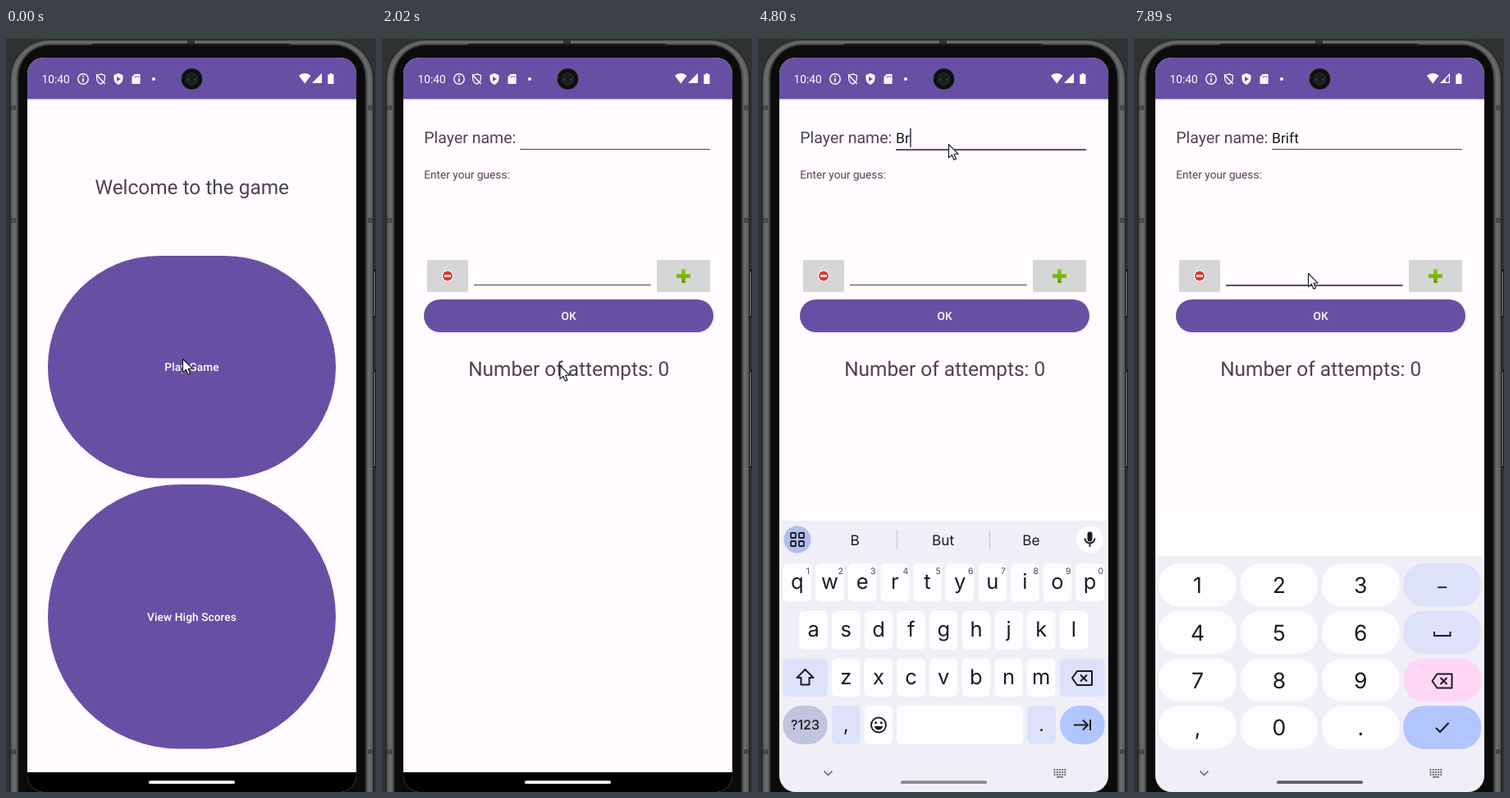
Write an HTML page that moves like this. It is 451x929 px and loops after 8 s.

```html
<!DOCTYPE html>
<html lang="en">
<head>
<meta charset="utf-8">
<title>Guessing game</title>
<style>
html, body { margin: 0; width: 100%; height: 100%; overflow: hidden; background: #2f3132; }
svg { display: block; width: 451px; height: 929px; font-family: Roboto, sans-serif; text-rendering: geometricPrecision; }
#keyboard, #numberPad { font-family: Inter, sans-serif; }
</style>
</head>
<body>
<svg id="stage" viewBox="0 0 451 929"></svg>
<script>
const PURPLE = '#6750a4', INK = '#1c1b1f', GREY = '#49454f', KEY = '#fdfdff', SOFT = '#dde1f9', BLUE = '#b1c5ff';

const rect = (x, y, w, h, fill, r = 0, extra = '') =>
  `<rect x="${x}" y="${y}" width="${w}" height="${h}" rx="${r}" fill="${fill}" ${extra}/>`;
const circle = (x, y, r, fill, extra = '') => `<circle cx="${x}" cy="${y}" r="${r}" fill="${fill}" ${extra}/>`;
const text = (x, y, size, fill, str, extra = '') =>
  `<text x="${x}" y="${y}" font-size="${size}" fill="${fill}" ${extra}>${str}</text>`;
const mid = (x, y, size, fill, str, extra = '') => text(x, y, size, fill, str, `text-anchor="middle" ${extra}`);
const fillPath = (d, fill, extra = '') => `<path d="${d}" fill="${fill}" ${extra}/>`;
const line = (d, color, w = 1.6, extra = '') =>
  `<path d="${d}" fill="none" stroke="${color}" stroke-width="${w}" ${extra}/>`;
const group = (id, body, extra = '') => `<g id="${id}" ${extra}>${body}</g>`;
const at = (x, y, body) => `<g transform="translate(${x} ${y})">${body}</g>`;

function phone() {
  const shells = [[4.5, 14, 48, '#262626'], [6, 15, 47, '#5c5c5c'], [8.5, 16.5, 45, '#6a6a6a'],
    [12, 18.5, 42, '#565656'], [14, 20, 40, '#2a2a2a'], [15.5, 21.5, 38, '#0b0b0b']];
  const gaps = [97, 234, 880].map(y => rect(6, y - 3, 6, 6, '#474747') + rect(441, y - 3, 6, 6, '#474747')).join('');
  const buttons = [[294, 58], [416, 119]].map(([y, h]) =>
    rect(446, y, 8, h, '#151515', 1) + rect(447.5, y + 2, 2.5, h - 4, '#666')).join('');
  return rect(0, 0, 451, 929, '#2f3132') + rect(0, 0, 451, 13, '#3c4142') + buttons +
    shells.map(([x, y, r, c]) => rect(x, y, 453 - 2 * x, 1000, c, r)).join('') +
    gaps + rect(221, 15, 9, 5, '#333') + rect(105, 19, 241, 2.5, '#171717', 1);
}

function statusBar() {
  const shield = 'M0 -7L5.5 -4.8V-.5Q5 5 0 7Q-5 5 -5.5 -.5V-4.8Z';
  return rect(26, 36, 401, 50.5, PURPLE) + text(43.5, 67, 13.8, '#fff', '10:40') +
    circle(94, 62, 6.2, 'none', 'stroke="#fff" stroke-width="1.4"') +
    rect(93.2, 61, 1.6, 4.5, '#fff') + rect(93.2, 58.2, 1.6, 1.6, '#fff') +
    at(115.5, 62, line(shield, '#fff', 1.4, 'transform="scale(.88)"') + line('M-5.5 -5.5L5 6', '#fff', 1.4)) +
    at(137, 62, fillPath(shield, '#fff') + fillPath('M-2 -3L3 0L-2 3Z', PURPLE)) +
    fillPath('M157 56H163.5V68H153.5V59.5Z', '#fff') +
    line('M157.5 58V60.5M159.6 58V60.5M161.6 58V60.5', PURPLE, .9) +
    circle(180, 62, 2, '#fff') +
    fillPath('M357 58Q364 52 371.5 58L364.2 67.5Z', '#fff') +
    fillPath('M385 55V67H373Z', '#fff') +
    group('weakSignal', fillPath('M383.8 58V65.8H380V61.8Z', PURPLE)) +
    fillPath('M394.5 55H397.5V56.5H399.5V68H392.3V56.5H394.5Z', '#fff') +
    circle(226.5, 62, 12.7, '#0f0f0f') + circle(226.5, 62, 7.5, '#1f1f1f', 'stroke="#2a2a2a"') +
    circle(226.5, 62, 3.5, '#17191f') + circle(222.5, 62.5, 1, '#46506a') + circle(230, 62.5, 1, '#46506a');
}

function sparkles() {
  let seed = 7, d = '';
  const rnd = () => (seed = seed * 16807 % 2147483647) / 2147483647;
  for (let i = 0; i < 520; i++) {
    const a = rnd() * Math.PI * 2, r = 78 + (rnd() + rnd()) * 28;
    d += `M${(r * Math.cos(a)).toFixed(1)} ${(r * Math.sin(a)).toFixed(1)}h.8`;
  }
  return line(d, '#cfc2e6', .8, 'opacity=".3"');
}

function home() {
  const label = 'font-weight="500" letter-spacing=".1"';
  return mid(226.7, 202, 24.4, GREY, 'Welcome to the game') +
    rect(51, 277, 351, 270.5, PURPLE, 135.25) +
    `<g clip-path="url(#playClip)">${group('ripple', circle(0, 0, 140, 'url(#glow)') +
      circle(0, 0, 104, '#fff', 'opacity=".035"') + circle(0, 0, 78, '#fff', 'opacity=".035"') + sparkles())}</g>` +
    rect(51, 555, 351, 321.5, PURPLE, 160.75) +
    mid(226.5, 417, 13.65, '#fff', 'Play Game', label) +
    mid(226.5, 721, 13.65, '#fff', 'View High Scores', label);
}

function game() {
  return text(51.3, 140, 19.5, GREY, 'Player name:') + text(51.3, 183, 13.65, GREY, 'Enter your guess:') +
    rect(168, 147, 232, 1, GREY, 0, 'id="nameLine"') + rect(112, 312, 215.5, 1, GREY, 0, 'id="guessLine"') +
    text(168, 140, 17.5, INK, '', 'id="name"') + rect(168, 122, 1.5, 23, '#343047', 0, 'id="caret"') +
    rect(55, 282, 50, 39, '#d4d6d5', 2) + rect(335, 282, 65, 39, '#d4d6d5', 2) +
    circle(80, 301.5, 7, '#fff') + circle(80, 301.5, 5.9, '#ee3030') + rect(76, 300.2, 8, 2.6, '#fff') +
    fillPath('M365.2 293H369.8V299.2H376V303.8H369.8V310H365.2V303.8H359V299.2H365.2Z', 'url(#leaf)') +
    rect(51, 330, 353, 40, PURPLE, 20) +
    mid(227.5, 355, 13.65, '#fff', 'OK', 'font-weight="500" letter-spacing=".1"') +
    mid(227.7, 423, 24.4, GREY, 'Number of attempts: 0');
}

const backspace = (x, y) => at(x, y,
  line('M-12 0L-6 -8.5H12V8.5H-6Z', INK, 2, 'stroke-linejoin="round"') + line('M-2 -4L6 4M6 -4L-2 4', INK, 2));

function toolbar() {
  return at(107.5, 622,
      line('M-9 -8.5H9V3L3 8.5H-9ZM9 2H3V8', INK, 2, 'stroke-linejoin="round"') +
      line('M-5 1Q-2 6 2 3', INK, 1.6) + circle(-4, -3, 1.4, INK) + circle(3.5, -3, 1.4, INK)) +
    mid(167, 627, 14, INK, 'GIF', 'font-weight="900" letter-spacing=".5"') +
    at(226.5, 622, line('M-8 -7.5H8V8.5H-8Z', INK, 2, 'stroke-linejoin="round"') + rect(-4, -10, 8, 4.5, INK, 1) +
      line('M-4.5 -2H4.5M-4.5 1.5H4.5M-4.5 5H2', INK, 1.7)) +
    at(286, 622, circle(0, 0, 5, 'none', `stroke="${INK}" stroke-width="4.5"`) +
      circle(0, 0, 7.8, 'none', `stroke="${INK}" stroke-width="3" stroke-dasharray="4.6 3.57"`)) +
    at(345, 622, fillPath('M0 -9.5C6 -9.5 9.5 -6 9.5 -1C9.5 3 6 4 3 3.5C0 3.5 3 9.5 0 9.5A9.5 9.5 0 1 1 0 -9.5Z', INK) +
      [[-5, 0], [-2.8, -4.5], [2.8, -4.5], [5.5, 0]].map(([x, y]) => circle(x, y, 1.5, '#f0eff7')).join(''));
}

function keyboard() {
  const step = 39.65;
  const row = (letters, x, y) => [...letters].map((c, i) =>
    rect(x + i * step - 17.3, y, 34.6, 46.5, KEY, 6) + mid(x + i * step, y + 31, 25.5, INK, c)).join('');
  const digits = [...'1234567890'].map((c, i) => mid(61 + i * step, 664, 10.5, GREY, c)).join('');
  const grid = [-5, 5].map(x => [-5, 5].map(y =>
    rect(48 + x - 3, 622 + y - 3, 6, 6, 'none', 1, `stroke="${INK}" stroke-width="1.8"`)).join('')).join('');
  const words = [118, 225.5, 333].map(x => mid(x, 628.5, 17.2, INK, '', 'class="word"')).join('');
  return rect(26, 599, 401, 330, '#f0eff7') +
    circle(48, 622, 16.5, '#c3cffb', 'id="menu"') + grid + group('tools', toolbar()) +
    group('words', words + rect(169, 610, 1, 24, '#c6c5ce') + rect(282, 610, 1, 24, '#c6c5ce')) +
    circle(404.5, 622, 16.5, KEY) +
    at(404.5, 622, rect(-3, -9.5, 6, 12, INK, 3) + line('M-6 -1.5A6 6 0 0 0 6 -1.5M0 4.5V9', INK, 1.9)) +
    row('qwertyuiop', 47.8, 651) + digits + row('asdfghjkl', 67.7, 709) + row('zxcvbnm', 107.2, 766.5) +
    rect(30.3, 766.5, 54.5, 46.5, SOFT, 6) + rect(368, 766.5, 54.7, 46.5, SOFT, 6) +
    line('M57.5 780L67.5 790H62.5V798.5H52.5V790H47.5Z', INK, 2, 'stroke-linejoin="round"') + backspace(395, 790.5) +
    rect(30.3, 824, 54.5, 47, '#c0c4dc', 23.5) + mid(57.5, 853, 16, INK, '?123', 'font-weight="500"') +
    rect(90, 824, 34.5, 47, SOFT, 6) + mid(107.2, 855, 23, INK, ',') +
    rect(129.7, 824, 34.5, 47, KEY, 6) + rect(169, 824, 154, 47, KEY, 6) +
    rect(328.3, 824, 34.7, 47, SOFT, 6) + mid(345.6, 855, 23, INK, '.') +
    at(147, 847.5, circle(0, 0, 9, 'none', `stroke="${INK}" stroke-width="1.9"`) + circle(-3.3, -2.8, 1.5, INK) +
      circle(3.3, -2.8, 1.5, INK) + fillPath('M-5.2 1.5H5.2Q3.8 6 0 6Q-3.8 6 -5.2 1.5Z', INK)) +
    rect(368, 824, 54.7, 47, BLUE, 23.5) + line('M385 847.5H401M396 841.5L402 847.5L396 853.5M405 841V854', INK, 2);
}

function numberPad() {
  const colors = [SOFT, SOFT, '#ffd7f5', BLUE];
  let body = rect(26, 599, 401, 43, '#fffeff') + rect(26, 642, 401, 287, '#f0eff7');
  [...'123–456 789 ,0. '].forEach((c, i) => {
    const col = i % 4, y = 651 + (i >> 2) * 57.75, x = 30 + col * 99.4;
    body += rect(x, y, 95, 52.5, col < 3 ? KEY : colors[i >> 2], 25);
    if (c !== ' ') body += mid(x + 47.5, y + 36, col < 3 ? 26.5 : 22, INK, c);
  });
  return body + line('M366 734V739H385.5V734', INK, 2) + backspace(375.5, 794) +
    line('M368 851L373 856L383.5 845', INK, 2.1);
}

function navBar() {
  let dots = '';
  for (let i = 0; i < 15; i++) dots += rect(360.5 + i % 5 * 3.2, 901 + (i / 5 | 0) * 3, 2, 2, '#6c6b73');
  return group('imeNav', line('M80.5 903.5L85.5 908.5L90.5 903.5', '#6c6b73', 1.7) + dots + rect(364, 910, 8, 1.6, '#6c6b73')) +
    rect(174, 915.3, 105, 3.8, '#fff', 1.9, 'id="pill"');
}

document.getElementById('stage').innerHTML = `<defs>
  <clipPath id="screenClip">${rect(26, 36, 401, 893, '#000', 20)}</clipPath>
  <clipPath id="playClip">${rect(51, 277, 351, 270.5, '#000', 135.25)}</clipPath>
  <radialGradient id="glow"><stop offset=".5" stop-color="#fff" stop-opacity=".08"/>
    <stop offset="1" stop-color="#fff" stop-opacity="0"/></radialGradient>
  <linearGradient id="leaf" x2="0" y2="1"><stop stop-color="#8fd000"/><stop offset="1" stop-color="#5f9c0a"/></linearGradient>
  </defs>` + phone() +
  group('screen', rect(26, 36, 401, 893, '#fffbff') + statusBar() + rect(26, 905, 401, 24, '#000') +
    group('home', home()) + group('game', game()) + group('keyboard', keyboard()) +
    group('numberPad', numberPad()) + navBar(), 'clip-path="url(#screenClip)"') +
  group('pointer', fillPath('M.5 .5V16.8L4.3 13.3L6.9 19.3L9.5 18.2L7 12.2H12Z', '#fff',
    'stroke="#15151c" stroke-width="1.1" stroke-linejoin="round"'));

const $ = id => document.getElementById(id);
const set = (el, attrs) => { for (const k in attrs) el.setAttribute(k, attrs[k]); };
const show = (id, on) => set($(id), { display: on ? 'inline' : 'none' });
const wordEls = [...document.querySelectorAll('.word')];

// Each track is a list of [start time, value...]; the latest started entry holds.
const held = (track, t) => track.filter(k => k[0] <= t).pop().slice(1);

const pointerTrack = [[0, 215, 402], [300, 215, 406], [430, 215, 410], [860, 216, 410], [1010, 216.5, 410],
  [2600, 217, 398], [2740, 219, 355], [2870, 223, 290], [3010, 227, 220], [3150, 230, 170], [3290, 232, 147],
  [3430, 232, 141], [6140, 229, 141], [6290, 219, 142], [6410, 210, 156], [6550, 199, 188], [6690, 190, 228],
  [6830, 187, 262], [6960, 197, 285], [7100, 209, 295], [7740, 211, 297], [7890, 212, 298]];
const nameTrack = [[0, ''], [4350, 'B'], [4800, 'Br'], [5100, 'Bri'], [5490, 'Brif'], [5870, 'Brift']];
const wordTrack = [[0, '', '', ''], [4530, 'B', 'But', 'Be'], [5220, 'Bri', 'Bring', 'Brief'],
  [5620, 'Brif', 'Brief', 'Brift'], [5870, 'Brift', 'Brief', 'Brift\'s']];
const pillTrack = [[0, '#fff'], [4530, '#bcbbc1'], [4800, '#8b8a8f'], [5100, '#727177'], [5220, '#605f66']];
const caretTrack = [[0, false], [3570, true], [4050, false], [4350, true], [6140, false], [7220, true], [7740, false]];

function draw(t) {
  const inGame = t >= 2020, padUp = t >= 7340, onGuess = t >= 7220, onName = t >= 3570 && !onGuess;
  show('home', !inGame);
  show('game', inGame);
  show('keyboard', t >= 3720 && !padUp);
  show('numberPad', padUp);
  show('imeNav', t >= 3720);
  show('weakSignal', t >= 6140);
  show('ripple', t >= 1750 && !inGame);
  set($('ripple'), { transform: `translate(221 411) scale(${t < 1900 ? .6 : 1})` });

  const [name] = held(nameTrack, t);
  $('name').textContent = name;
  show('caret', held(caretTrack, t)[0]);
  set($('caret'), onGuess ? { x: 112, y: 286 } : { x: 168.3 + (name && inGame ? $('name').getComputedTextLength() : 0), y: 122 });
  set($('nameLine'), { height: onName ? 2 : 1, fill: onName ? '#57506e' : GREY });
  set($('guessLine'), { height: onGuess ? 2 : 1, fill: onGuess ? '#57506e' : GREY });

  const typing = t >= 4530;
  show('tools', !typing);
  show('words', typing);
  set($('menu'), { fill: typing ? '#b0bdee' : '#c3cffb' });
  held(wordTrack, t).forEach((w, i) => { wordEls[i].textContent = w; });
  set($('pill'), { fill: held(pillTrack, t)[0] });

  const [x, y] = held(pointerTrack, t);
  set($('pointer'), { transform: `translate(${x} ${y})` });
}

const start = performance.now();
function tick() {
  draw((performance.now() - start) % 8000);
  requestAnimationFrame(tick);
}
tick();
</script>
</body>
</html>
```
